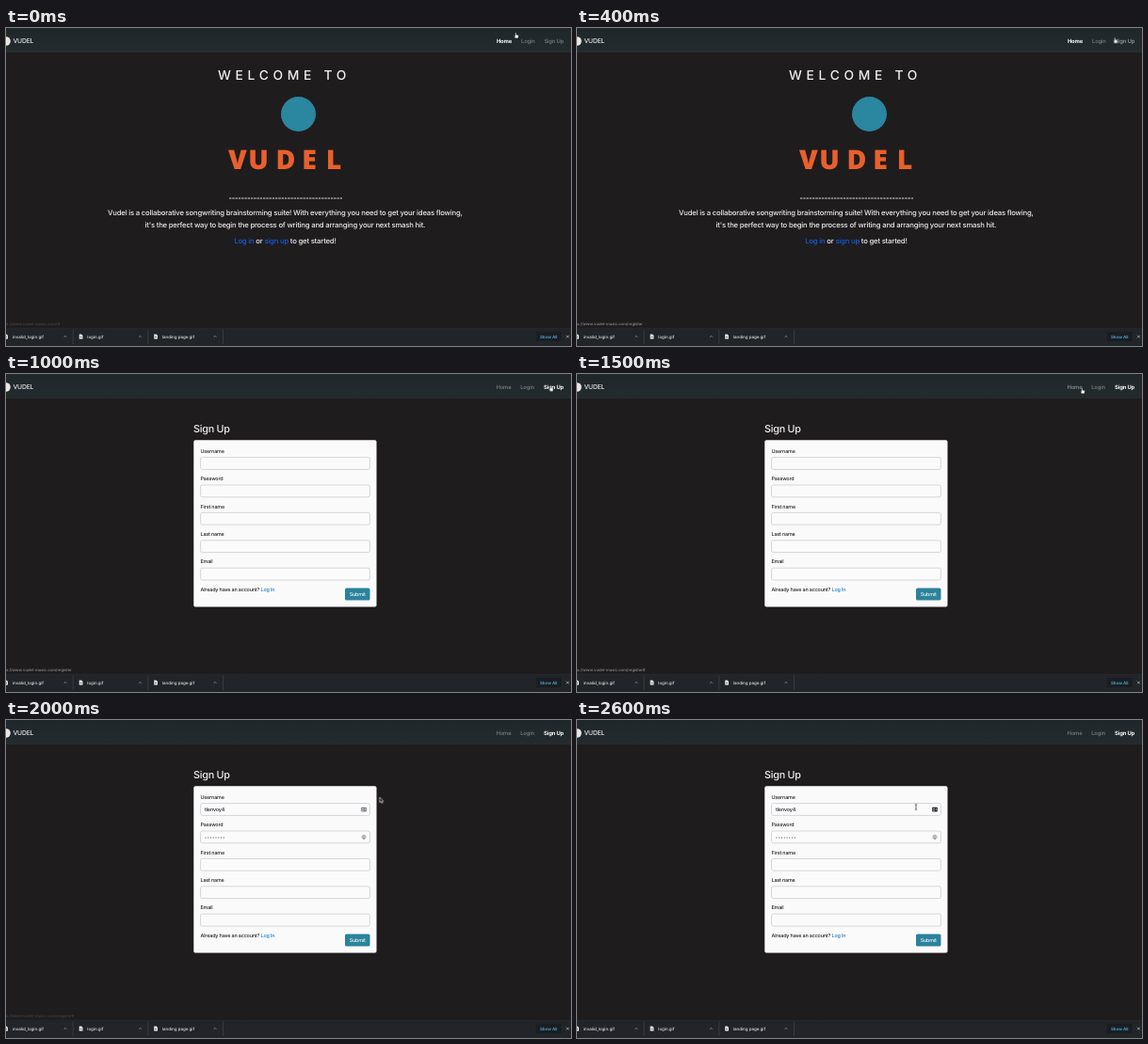
These frames come from a looping animation (600x338 px, 2700 ms). An HTML page:

```html
<!DOCTYPE html>
<html lang="en">
<head>
<meta charset="utf-8">
<title>Vudel</title>
<style>
html, body { margin: 0; width: 100%; height: 100%; overflow: hidden; background: #1f1c1e; }
svg { display: block; width: 100%; height: 100%; }
text { font-family: Inter, Roboto, sans-serif; font-weight: 500; letter-spacing: -.03em; text-rendering: geometricPrecision; }
.mid { text-anchor: middle; }
.copy { font-size: 7.7px; fill: #eeedee; }
.copy text { letter-spacing: -.025em; }
.nav { font-size: 5.9px; fill: #7b8183; }
.nav .on { font-weight: 700; fill: #fff; }
.form { font-size: 5.4px; fill: #1d1f22; }
.small { font-size: 4.5px; fill: #e2e3e4; }
.small text { letter-spacing: -.01em; }
.small .all { font-weight: 600; fill: #55abd2; }
.status { font-size: 4.2px; fill: #8d9093; }
.status text { letter-spacing: 0; }
.link { fill: #0f5fdc; }
.field { fill: #fcfbfc; stroke: #c3c7cc; stroke-width: .7; }

/* 100 ms is 3.7037% of the loop */
.step { animation: 2.7s step-end infinite; }
#landing { animation-name: landing; }
#signup { animation-name: signup; }
#filled { animation-name: filled; }
#card { animation-name: card; }
#submit { animation-name: submit; }
#overUp { animation-name: overUp; }
#overHome { animation-name: overHome; }
#urlHome { animation-name: urlHome; }
#urlUp { animation-name: urlUp; }
#urlHash { animation-name: urlHash; }
#pointer { animation-name: pointer; }
#hand { animation-name: hand; }
#arrow { animation-name: arrow; }
#beam { animation-name: beam; }

@keyframes landing { 0% { opacity: 1 } 37.03%, 100% { opacity: 0 } }
@keyframes signup { 0% { opacity: 0 } 37.03%, 100% { opacity: 1 } }
@keyframes filled { 0% { opacity: 0 } 70.37%, 100% { opacity: 1 } }
@keyframes card { 0% { fill: #777a7e } 96.29%, 100% { fill: #1d1f22 } }
@keyframes submit { 0% { fill: #2c829b } 88.88% { fill: #256e84 } 92.59%, 100% { fill: #2c829b } }
@keyframes overUp { 0% { fill: #7b8183 } 14.81% { fill: #a2a6a8 } 25.92%, 100% { fill: #b4b7b8 } }
@keyframes overHome { 0% { fill: #7b8183 } 55.55% { fill: #92979a } 59.25%, 100% { fill: #7b8183 } }
@keyframes urlHome { 0% { opacity: .35 } 3.7% { opacity: .8 } 7.4% { opacity: 1 } 14.81%, 100% { opacity: 0 } }
@keyframes urlUp { 0% { opacity: 0 } 14.81% { opacity: 1 } 55.55%, 100% { opacity: 0 } }
@keyframes urlHash { 0% { opacity: 0 } 55.55% { opacity: 1 } 70.37% { opacity: .7 } 74.07% { opacity: .3 } 77.77%, 100% { opacity: 0 } }
@keyframes pointer {
  0% { transform: translate(542px, 8px) }
  3.7% { transform: translate(548px, 10px) }
  7.4% { transform: translate(556px, 12px) }
  11.11% { transform: translate(565px, 13px) }
  14.81% { transform: translate(571.8px, 13.3px) }
  18.51% { transform: translate(575px, 14px) }
  22.22% { transform: translate(577px, 14.8px) }
  25.92% { transform: translate(578px, 15.3px) }
  29.62% { transform: translate(579px, 15.5px) }
  55.55% { transform: translate(537px, 18px) }
  59.25% { transform: translate(452px, 58px) }
  62.96% { transform: translate(396px, 88px) }
  70.37% { transform: translate(397px, 86px) }
  74.07% { transform: translate(398.5px, 85px) }
  77.77% { transform: translate(398px, 108px) }
  81.48% { transform: translate(394px, 156px) }
  85.18% { transform: translate(384px, 204px) }
  88.88% { transform: translate(374px, 234px) }
  92.59% { transform: translate(366px, 165px) }
  96.29%, 100% { transform: translate(360px, 92.5px) }
}
@keyframes hand { 0% { opacity: 1 } 59.25% { opacity: 0 } 88.88% { opacity: 1 } 92.59%, 100% { opacity: 0 } }
@keyframes arrow { 0% { opacity: 0 } 59.25% { opacity: 1 } 88.88% { opacity: 0 } 92.59% { opacity: 1 } 96.29%, 100% { opacity: 0 } }
@keyframes beam { 0% { opacity: 0 } 96.29%, 100% { opacity: 1 } }
</style>
</head>
<body>
<svg viewBox="0 0 600 338">
  <defs>
    <linearGradient id="bar" x2="0" y2="1">
      <stop stop-color="#20272a"/><stop offset="1" stop-color="#242b2e"/>
    </linearGradient>
    <g id="file">
      <path d="M-1.8-2.6H.6L2-1.2V2.6H-1.8Z" fill="#e6e7e8"/>
      <path d="M-.8.4H1" stroke="#4a4d51" stroke-width=".8"/>
    </g>
    <path id="chevron" d="M-1.4.7L0-.7L1.4.7" fill="none" stroke="#a5a8ab" stroke-width=".7"/>
  </defs>

  <rect width="600" height="338" fill="#1f1c1e"/>
  <rect width="600" height="26" fill="url(#bar)"/>
  <circle cx="0" cy="14" r="4.8" fill="#e9e6e4"/>
  <text x="7.5" y="16.2" font-size="6.8" fill="#e4e5e6">VUDEL</text>

  <g id="landing" class="step">
    <g class="nav mid">
      <text class="on" x="529" y="15.8">Home</text>
      <text x="554.4" y="15.8">Login</text>
      <text id="overUp" class="step" x="581.8" y="15.8">Sign Up</text>
    </g>
    <text x="225" y="55.3" font-size="13.8" fill="#f0eff0" style="letter-spacing:4.7px">WELCOME TO</text>
    <circle cx="310.5" cy="91.5" r="18.5" fill="#2b86a0"/>
    <text class="mid" x="246 268 297 322 348" y="149.7" font-size="28.5" fill="#e8602c"
      style="font-family:'Open Sans',sans-serif;font-weight:800;letter-spacing:0">VUDEL</text>
    <path d="M237 181H357" stroke="#dcdbdc" stroke-dasharray="2.4 .87"/>
    <g class="copy mid">
      <text x="296.4" y="199.4">Vudel is a collaborative songwriting brainstorming suite! With everything you need to get your ideas flowing,</text>
      <text x="296.4" y="211.5">it's the perfect way to begin the process of writing and arranging your next smash hit.</text>
      <text x="296.4" y="229.4"><tspan class="link">Log in</tspan> or <tspan class="link">sign up</tspan> to get started!</text>
    </g>
  </g>

  <g id="signup" class="step">
    <g class="nav mid">
      <text id="overHome" class="step" x="528.5" y="15.8">Home</text>
      <text x="553.5" y="15.8">Login</text>
      <text class="on" x="581.6" y="15.8">Sign Up</text>
    </g>
    <text x="199" y="62.3" font-size="10.8" fill="#f0eff0" style="letter-spacing:-.022em">Sign Up</text>
    <rect x="199.3" y="70.2" width="194.2" height="177.3" rx="1.8" fill="#fbfafb"/>
    <g class="form">
      <g id="rows"></g>
      <text x="206.5" y="231">Already have an account? <tspan fill="#1478c8">Log In</tspan></text>
      <rect id="submit" class="step" x="360" y="227.5" width="26.5" height="13" rx="1.6" fill="#2c829b"/>
      <text class="mid" x="373.2" y="236" fill="#eef5f7">Submit</text>
      <g id="filled" class="step">
        <text x="211" y="97.1">tlenvoy4</text>
        <path d="M212 125H232" stroke="#33363a" stroke-width="1.2" stroke-linecap="round" stroke-dasharray="0 2.75"/>
        <rect id="card" class="step" x="377.2" y="92.8" width="5.6" height="4.6" rx=".7" fill="#777a7e"/>
        <circle cx="379" cy="94.5" r=".7" fill="#fff"/>
        <path d="M378 96.4h2M380.8 94.3h1.2M380.8 95.7h1.2" stroke="#fff" stroke-width=".6"/>
        <circle cx="380" cy="124.3" r="2.1" fill="#d4d6d8" stroke="#85888c" stroke-width=".6"/>
        <path d="M380 123.3V127.4" stroke="#85888c" stroke-width=".8"/>
      </g>
    </g>
  </g>

  <g class="status">
    <text id="urlHome" class="step" x="0" y="316.4">s://www.vudel-music.com/#</text>
    <text id="urlUp" class="step" x="0" y="316.4">s://www.vudel-music.com/register</text>
    <text id="urlHash" class="step" x="0" y="316.4">s://www.vudel-music.com/register#</text>
  </g>

  <rect y="319" width="600" height="19" fill="#212429"/>
  <path d="M0 319.2H600" stroke="#2b2e32" stroke-width=".5"/>
  <path d="M71.2 320.5V336M150.8 320.5V336M230.5 320.5V336" stroke="#43464a" stroke-width=".7"/>
  <use href="#file" x="0" y="328"/><use href="#file" x="79.5" y="328"/><use href="#file" x="159" y="328"/>
  <use href="#chevron" x="63" y="328"/><use href="#chevron" x="142.5" y="328"/><use href="#chevron" x="222" y="328"/>
  <rect x="562" y="322.3" width="28.5" height="11.4" rx="1.5" fill="#1a1d22" stroke="#2d3136" stroke-width=".5"/>
  <g class="small">
    <text x="7" y="329.7">invalid_login.gif</text>
    <text x="86.3" y="329.7">login.gif</text>
    <text x="166" y="329.7">landing page.gif</text>
    <text class="mid all" x="576.2" y="329.6">Show All</text>
  </g>
  <path d="M595 326.6l2.8 2.8m0-2.8l-2.8 2.8" stroke="#c4c6c8" stroke-width=".7"/>

  <g id="pointer" class="step">
    <path id="hand" class="step" d="M-1.3-2.6a.6.6 0 0 1 1.2 0V-.9L1.9-.4Q2.5-.2 2.3.5L1.8 2.9H-1L-2.4.7Q-2.3 0-1.3.5Z" fill="#fff" stroke="#15171a" stroke-width=".5"/>
    <path id="arrow" class="step" d="M-1.7-3V2.6L-.4 1.5L.5 3.5L1.4 3.1L.6 1.2H2.3Z" fill="#111" stroke="#dedede" stroke-width=".7"/>
    <path id="beam" class="step" d="M-1.2-2.9Q0-2.9 0-2.2Q0-2.9 1.2-2.9M0-2.3V2.3M-1.2 2.9Q0 2.9 0 2.2Q0 2.9 1.2 2.9" fill="none" stroke="#26282b" stroke-width=".7"/>
  </g>
</svg>
<script>
const labels = ["Username", "Password", "First name", "Last name", "Email"];
document.getElementById("rows").innerHTML = labels.map((label, i) => {
  const y = i * 29.4;
  return `<text x="206.5" y="${83.8 + y}">${label}</text>
    <rect class="field" x="206.6" y="${88.6 + y}" width="179.8" height="12.8" rx="1.8"/>`;
}).join("");
</script>
</body>
</html>
```
